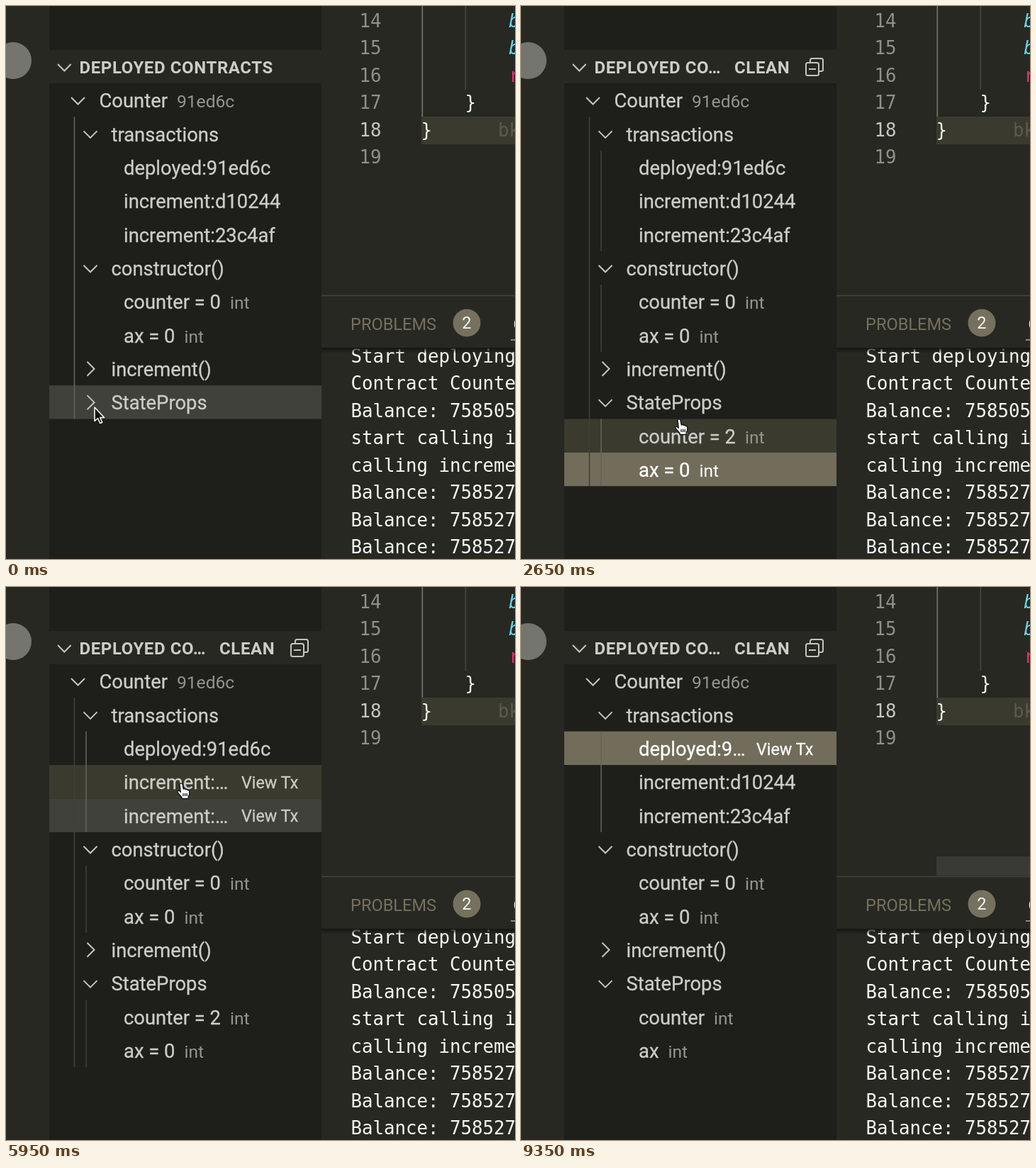
An HTML page that plays this animation: 718x780 px, repeating every 9.55 s.

```html
<!DOCTYPE html>
<html lang="en">
<head>
<meta charset="utf-8">
<title>Deployed contracts</title>
<style>
html, body { margin: 0; width: 100%; height: 100%; overflow: hidden; background: #272822; }
svg { display: block; width: 718px; height: 780px; }
text { white-space: pre; font: 27.4px Roboto, sans-serif; fill: #cdcdc8; }
#tree text { stroke: #cdcdc8; stroke-width: .3; }
#tree .desc { font-size: 24.6px; fill: #94958f; stroke: none; }
.action { font-size: 23.3px; }
.head { font-size: 24px; font-weight: 700; letter-spacing: .6px; }
.mono { font: 25.75px "DejaVu Sans Mono", monospace; fill: #f8f8f2; }
.mono.num { fill: #8f908a; }
.mono.now { fill: #c6c6c2; }
.mono.fn { fill: #66d9ef; font-style: italic; }
.mono.key { fill: #f92672; }
.mono.blame { fill: #5b5c50; }
.tab { font-size: 23.6px; fill: #75715e; }
#tree .on text { fill: #fff; stroke: #fff; }
#tree .on .desc { fill: #fff; }
.icon { fill: none; stroke: #c5c5c0; stroke-width: 2; }
.guide { stroke: #3f4039; stroke-width: 1.6; }
.guide.lit { stroke: #62635b; }
</style>
</head>
<body>
<svg id="stage" viewBox="0 0 718 780">
  <defs>
    <linearGradient id="shade" x2="0" y2="1">
      <stop stop-color="#151612"/>
      <stop offset="1" stop-color="#151612" stop-opacity="0"/>
    </linearGradient>
  </defs>
  <rect width="718" height="780" fill="#272822"/>
  <rect x="61" width="384" height="780" fill="#1e1f1b"/>
  <circle cx="10" cy="77" r="26" fill="#74756f"/>

  <g id="editor">
    <rect x="586" y="156" width="132" height="39" fill="#3a3b2e"/>
    <path d="M587.3 0V156" stroke="#767770" stroke-width="1.6"/>
    <path d="M648.3 0V118" stroke="#464741" stroke-width="1.6"/>
  </g>
  <rect id="scroll" x="586" y="380" width="132" height="27" fill="#393a36"/>

  <g id="output"></g>
  <rect x="445" y="409" width="273" height="74" fill="#272822"/>
  <path d="M445 408.5H718" stroke="#43443c" stroke-width="1.6"/>
  <rect x="445" y="482" width="273" height="8" fill="url(#shade)"/>
  <text class="tab" x="486" y="456.5">PROBLEMS</text>
  <circle cx="650" cy="447" r="19.5" fill="#75715e"/>
  <text class="tab" x="650" y="454.5" text-anchor="middle" style="fill:#f8f8f2">2</text>
  <text class="tab" x="715.5" y="456.5" style="fill:#f8f8f2">O</text>
  <path d="M712 471H718" stroke="#a5a59c" stroke-width="1.6"/>

  <rect x="61" y="62" width="384" height="47" fill="#272822"/>
  <path class="icon" d="M73 82l9.3 9.5 9.3-9.5"/>
  <text class="head" id="title" x="103.5" y="95.3"></text>
  <g id="tools">
    <text class="head" x="301" y="95.3">CLEAN</text>
    <path class="icon" d="M408 80V76.5q0-2.500 2.500-2.500H423.500q2.500 0 2.500 2.500V89.500q0 2.500-2.500 2.500H420"/>
    <rect class="icon" x="402" y="80" width="18" height="18" rx="2.500"/>
    <path class="icon" d="M406 89h10"/>
  </g>

  <g id="tree"></g>
  <g id="guides"></g>

  <g id="pointer">
    <path id="arrow" d="M0 0V19.500L4.500 15.500 7.700 22.500 10.700 21.200 7.700 14.500H13.500Z"
      fill="#111" stroke="#fff" stroke-width="1.5" stroke-linejoin="round"/>
    <g id="hand" stroke="#111" stroke-width="1.3" stroke-linejoin="round">
      <path fill="#fff" d="M-2 1.500Q-1.800-.3 0-.2 1.600-.1 2 1.500L3.200 8Q5.300 6.800 6.500 8.500 8.400 7.600 9.400 9.500 11.600 9.300 11.800 11.500L11.600 15.500 10.200 18.500V21.500H1V19.500L-3.500 14.500Q-6 11.500-4.500 10.500-3 9.700-.700 12.200Z"/>
      <path fill="none" d="M3 14v4M5.600 14v4M8.200 14v4"/>
    </g>
    <path id="beam" d="M-4-11q4 0 4 3V8q0 3-4 3M4-11q-4 0-4 3M0 8q0 3 4 3" fill="none" stroke="#ddd" stroke-width="1.6"/>
  </g>
</svg>

<script>
const LOOP = 9550, TOP = 109, ROW = 47.35, LINE = 38.5;
const $ = id => document.getElementById(id);

function add(parent, tag, attrs, text) {
  const el = document.createElementNS('http://www.w3.org/2000/svg', tag);
  for (const k in attrs) el.setAttribute(k, attrs[k]);
  if (text) el.textContent = text;
  parent.appendChild(el);
  return el;
}
const show = (el, on) => el.style.display = on ? '' : 'none';
const code = (parent, x, y, text, cls = '') =>
  add(parent, 'text', { class: 'mono ' + cls, x, y }, text);

// Editor and output text, with lines on whole pixels
const lineY = n => 30 + Math.floor((n - 14) * LINE);
for (let n = 14; n < 20; n++) code($('editor'), 498.5, lineY(n), '' + n, n === 18 ? 'now' : 'num');
code($('editor'), 709, lineY(14), 'b', 'fn');
code($('editor'), 709, lineY(15), 'b', 'fn');
code($('editor'), 709.5, lineY(16), 'r', 'key');
code($('editor'), 647.5, lineY(17), '}');
code($('editor'), 585.5, lineY(18), '}');
code($('editor'), 694, lineY(18), 'bk', 'blame');
['Start deploying', 'Contract Counte', 'Balance: 758505', 'start calling i', 'calling increme',
  'Balance: 758527', 'Balance: 758527', 'Balance: 758527']
  .forEach((s, i) => code($('output'), 486.5, 503 + Math.floor(i * LINE), s));

// Tree rows: depth, label, description, shortened label
const rows = [
  [0, 'Counter', '91ed6c'],
  [1, 'transactions'],
  [2, 'deployed:91ed6c', '', 'deployed:9…'],
  [2, 'increment:d10244', '', 'increment:…'],
  [2, 'increment:23c4af', '', 'increment:…'],
  [1, 'constructor()'],
  [2, 'counter = 0', 'int'],
  [2, 'ax = 0', 'int'],
  [1, 'increment()'],
  [1, 'StateProps'],
  [2, 'counter', 'int'],
  [2, 'ax', 'int']
].map(([depth, label, desc, short], i) => {
  const g = add($('tree'), 'g', { transform: `translate(0 ${TOP + i * ROW})` });
  const bg = add(g, 'rect', { x: 61, width: 384, height: ROW });
  const text = add(g, 'text', { x: [131.5, 148.5, 166][depth], y: 34.3 });
  const name = add(text, 'tspan', {}, label);
  if (desc) add(text, 'tspan', { class: 'desc', dx: 13 }, desc);
  const chevron = depth < 2 && add(g, 'path', { class: 'icon' });
  const view = short && add(g, 'text', { class: 'action', x: 332, y: 33 }, 'View Tx');
  return { g, bg, name, label, short, view, chevron, x: depth ? 119 : 101.5 };
});

const guide = (x, from, to) => add($('guides'), 'path', {
  class: 'guide', d: `M${x} ${TOP + from * ROW}V${TOP + to * ROW}`
});
const guides = {
  short: guide(96.5, 1, 10), root: guide(96.5, 1, 12),
  tx: guide(113, 2, 5), args: guide(113, 6, 8), state: guide(113, 10, 12)
};

// Pointer path: time, x, y
const path = [
  [0, 125, 566], [550, 129, 562], [850, 129, 562], [1150, 172, 591], [1750, 205, 653],
  [1850, 205, 653], [2250, 238, 648], [2650, 223, 583], [2800, 222, 545], [3600, 240, 276],
  [3750, 240, 276], [4200, 250, 284], [4500, 242, 291], [4700, 243, 321], [4850, 243, 321],
  [5400, 244, 326], [5550, 244, 326], [5950, 247, 277], [6500, 248, 273], [6600, 248, 273],
  [7200, 265, 233], [7500, 290, 229], [7600, 290, 229], [8100, 313, 292], [8500, 330, 325],
  [8850, 330, 325], [9300, 735, 230], [LOOP, 735, 230]
];

// Clicks: time, selected row, has focus, counter value, ax value
const steps = [
  [0, 9, 0, ' = 2', ' = 0'], [600, 9, 1, ' = 2', ' = 0'], [1800, 11, 1, ' = 2', ' = 0'],
  [3700, 3, 1, ' = 1', ' = 0'], [4850, 4, 1, ' = 2', ' = 0'], [5400, 4, 0, ' = 2', ' = 0'],
  [6550, 3, 1, ' = 1', ' = 0'], [7300, 2, 1, '', '']
];

function pointerAt(t) {
  const i = path.findIndex(p => p[0] > t);
  const [t0, x0, y0] = path[i - 1], [t1, x1, y1] = path[i];
  const k = (t - t0) / (t1 - t0), e = k * k * (3 - 2 * k);
  return [x0 + (x1 - x0) * e, y0 + (y1 - y0) * e];
}

function draw(t) {
  const [x, y] = pointerAt(t);
  const [, sel, focus, counter, ax] = steps.filter(s => s[0] <= t).pop();
  const open = t >= 600, entered = t >= 100;
  const inside = entered && x < 445;
  const hover = inside ? Math.floor((y - TOP) / ROW) : -1;

  rows[10].label = 'counter' + counter;
  rows[11].label = 'ax' + ax;
  rows.forEach((r, i) => {
    const chosen = i === sel, over = i === hover, tools = r.short && (chosen || over);
    show(r.g, open || i < 10);
    r.g.setAttribute('class', chosen && focus ? 'on' : '');
    r.bg.setAttribute('fill', chosen ? (focus ? '#726d5a' : '#40413a') : over ? '#3a3b2e' : 'none');
    r.name.textContent = tools ? r.short : r.label;
    if (r.view) show(r.view, tools);
    if (r.chevron) {
      const shut = i === 8 || (i === 9 && !open);
      r.chevron.setAttribute('d', shut ? 'M114.500 14l10 10-10 10' : `M${r.x - 9.5} 20l9.500 9.500 9.500-9.500`);
    }
  });

  const lit = !open ? 'short' : sel > 8 ? 'state' : 'tx';
  for (const k in guides) {
    const exists = k === 'short' ? !open : k === 'root' || k === 'state' ? open : true;
    show(guides[k], exists && (k === lit || inside));
    guides[k].classList.toggle('lit', k === lit);
  }

  const active = inside || focus;
  $('title').textContent = active ? 'DEPLOYED CO…' : 'DEPLOYED CONTRACTS';
  show($('tools'), active);
  show($('scroll'), x > 445 && y < 408);
  $('pointer').setAttribute('transform', `translate(${x} ${y})`);
  show($('arrow'), !entered);
  show($('hand'), inside);
  show($('beam'), x >= 445);
}

const start = performance.now();
function tick() {
  const t = Math.max(0, performance.now() - start) % LOOP;
  draw(Math.floor(t / 50) * 50);
  requestAnimationFrame(tick);
}
tick();
</script>
</body>
</html>
```
